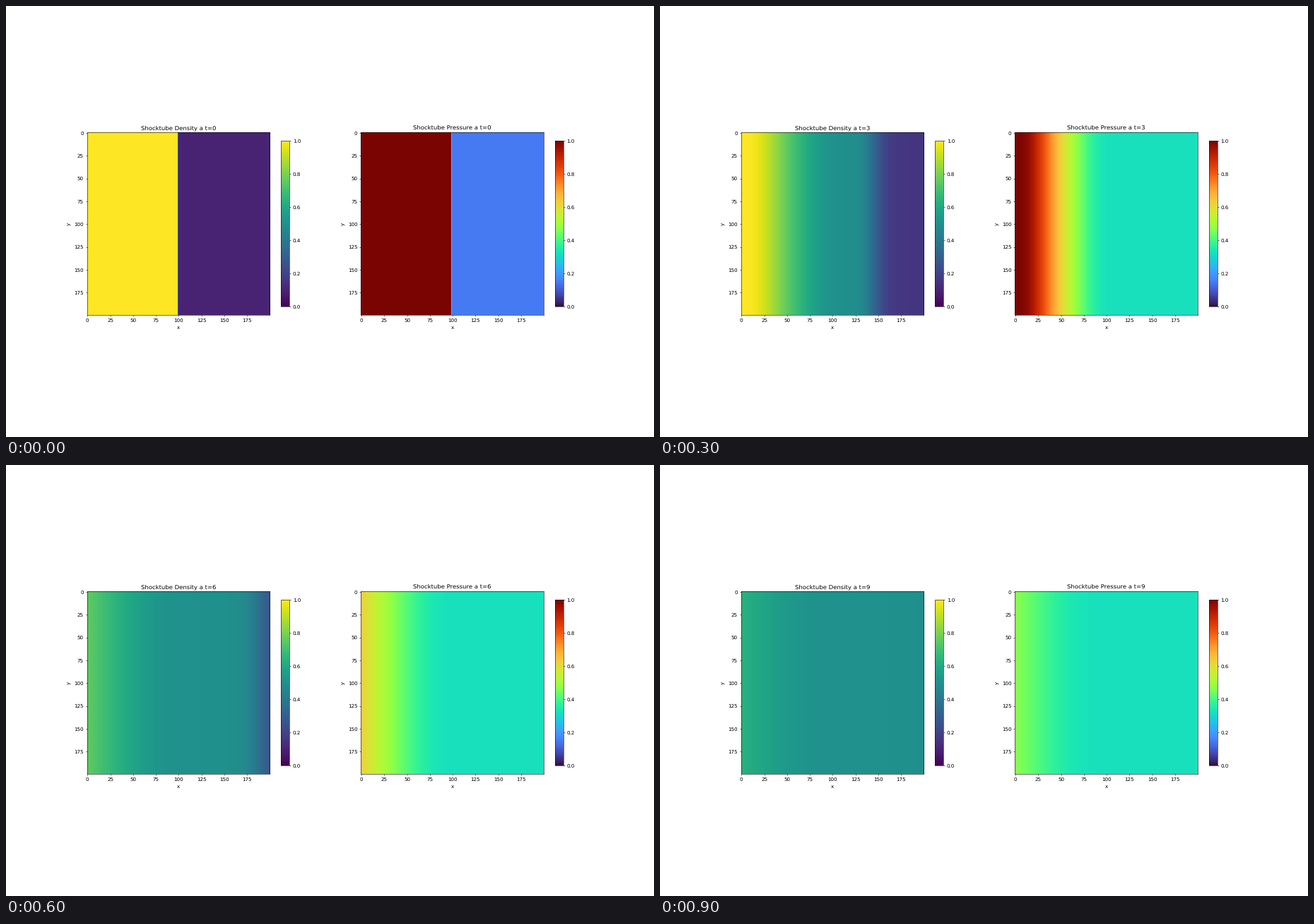
Recreate the animation shown at these times as a matplotlib script. Size 917 px wide and 611 px high, loop 1000 ms.

```python
import numpy as np
import matplotlib.pyplot as plt
from matplotlib.animation import FuncAnimation

WIDTH, HEIGHT = 917, 611
DPI = WIDTH / 18
FRAMES, INTERVAL = 10, 100

CELLS, DIAPHRAGM = 200, 99
GAMMA = 5 / 3
LEFT, RIGHT = (1.0, 1.0), (0.1, 0.15)   # density, pressure
FRAME_TIME = 20                         # with dx = 1
STEPS = 100


def primitives(u):
    rho, mom, energy = u
    vel = mom / rho
    return rho, vel, (GAMMA - 1) * (energy - 0.5 * mom * vel)


def rusanov_step(u, dt):
    """First-order local Lax-Friedrichs update with open ends."""
    u = np.pad(u, ((0, 0), (1, 1)), mode="edge")
    rho, vel, p = primitives(u)
    speed = np.abs(vel) + np.sqrt(GAMMA * p / rho)
    fastest = np.maximum(speed[:-1], speed[1:])
    f = np.array([u[1], u[1] * vel + p, (u[2] + p) * vel])
    face = 0.5 * (f[:, :-1] + f[:, 1:] - fastest * np.diff(u))
    return u[:, 1:-1] - dt * np.diff(face)


def simulate():
    is_left = np.arange(CELLS) < DIAPHRAGM
    rho = np.where(is_left, LEFT[0], RIGHT[0])
    p = np.where(is_left, LEFT[1], RIGHT[1])
    u = np.array([rho, np.zeros(CELLS), p / (GAMMA - 1)])
    history = [(rho, p)]
    for _ in range(FRAMES - 1):
        for _ in range(STEPS):
            u = rusanov_step(u, FRAME_TIME / STEPS)
        rho, _, p = primitives(u)
        history.append((rho, p))
    return history


def as_field(profile):
    return np.tile(profile, (CELLS, 1))


plt.rcParams.update({"font.family": "DejaVu Sans", "text.hinting": "none"})
history = simulate()
fig, axes = plt.subplots(1, 2, figsize=(18, HEIGHT / DPI), dpi=DPI)
names = ("Density", "Pressure")
images = []
for ax, cmap, profile in zip(axes, ("viridis", "turbo"), history[0]):
    image = ax.imshow(as_field(profile), cmap=cmap, vmin=0, vmax=1)
    fig.colorbar(image, ax=ax, shrink=0.5)
    ax.set(xlabel="x", ylabel="y")
    images.append(image)


def update(t):
    for ax, image, name, profile in zip(axes, images, names, history[t]):
        image.set_data(as_field(profile))
        ax.set_title(f"Shocktube {name} a t={t}")
    return images


anim = FuncAnimation(fig, update, frames=FRAMES, interval=INTERVAL,
                     repeat=True, repeat_delay=0, blit=False)
plt.show()
```
